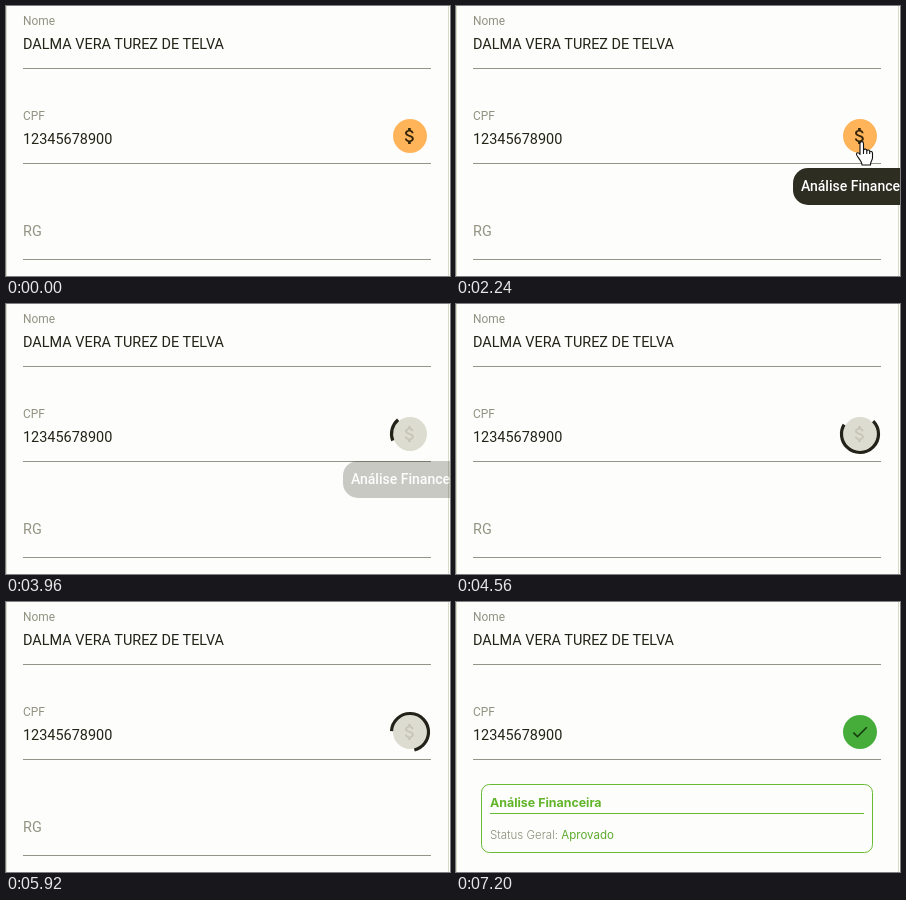
An HTML page that plays this animation: 444 px wide and 270 px high, repeating every 8000 ms.

```html
<!DOCTYPE html>
<html lang="pt">
<head>
<meta charset="utf-8">
<style>
  html, body { margin: 0; width: 100%; height: 100%; overflow: hidden; background: #fdfdfb; }
  svg { display: block; width: 444px; height: 270px; }
  text { font: 14.44px Roboto, sans-serif; fill: #232318; }
  .label { font-size: 11.9px; fill: #929283; }
  .hint { fill: #949484; }
  .rule { stroke: #949488; }
  .edge { stroke: #d9dac8; }
  #tip text { font-size: 14px; font-weight: 500; fill: #fff; }
  #card text { font: 300 11.5px Inter, sans-serif; fill: #8a8e78; }
  #card .title { font: 700 12.4px Inter, sans-serif; fill: #62b52a; }
  #card tspan { font-weight: 400; fill: #5cab2c; }
  #card rect, #card path { fill: none; stroke: #68b934; }
</style>
</head>
<body>
<svg viewBox="0 0 444 270">
  <path class="edge" d="M.5 0V270M442.5 0V270"/>
  <path class="rule" d="M17 62.5H425M17 157.5H425"/>
  <text class="label" x="17" y="19">Nome</text>
  <text x="17" y="43">DALMA VERA TUREZ DE TELVA</text>
  <text class="label" x="17" y="114">CPF</text>
  <text x="17" y="138">12345678900</text>

  <g id="rg">
    <text class="hint" x="17" y="230">RG</text>
    <path class="rule" d="M17 253.5H425"/>
  </g>
  <g id="card">
    <rect x="25.5" y="182.5" width="391" height="68" rx="8"/>
    <text class="title" x="34" y="205">Análise Financeira</text>
    <path d="M34 211.5H408"/>
    <text x="34" y="237">Status Geral: <tspan>Aprovado</tspan></text>
  </g>

  <circle id="pulse" cx="404.5" cy="134" fill="#fff0d2" stroke="#ffbf62" stroke-width="5"/>
  <circle id="button" cx="404" cy="130" r="17"/>
  <path id="dollar" transform="translate(393.3 119.4) scale(.88)" d="M11.8 10.9c-2.27-.59-3-1.2-3-2.15 0-1.09 1.01-1.85 2.7-1.85 1.78 0 2.44.85 2.5 2.1h2.21c-.07-1.72-1.12-3.3-3.21-3.81V3h-3v2.16c-1.94.42-3.5 1.68-3.5 3.61 0 2.31 1.91 3.46 4.7 4.13 2.5.6 3 1.48 3 2.41 0 .69-.49 1.79-2.7 1.79-2.06 0-2.87-.92-2.98-2.1h-2.2c.12 2.19 1.76 3.42 3.68 3.83V21h3v-2.15c1.95-.37 3.5-1.5 3.5-3.55 0-2.84-2.43-3.81-4.7-4.4z"/>
  <path id="check" transform="translate(394 120) scale(.83)" fill="#173b0c" d="M9 16.17L4.83 12l-1.42 1.41L9 19 21 7l-1.41-1.41z"/>
  <circle id="spinner" cx="404" cy="130" r="18.5" pathLength="360" fill="none" stroke="#222218" stroke-width="3.2"/>

  <g id="tip">
    <rect x="337" y="162" width="140" height="37" rx="15" fill="#2d2d22"/>
    <text x="345" y="185">Análise Financeira</text>
  </g>
  <g id="hand" fill="#fff" stroke="#111" stroke-width="1.1" stroke-linejoin="round">
    <path d="M4 2.5C4 0 7.5 0 7.5 2.5V9C8 7.5 10.8 8 10.8 9.6 11.5 8.5 13.7 9 13.7 10.6 14.5 9.7 16.5 10.5 16.5 12V17C16.5 19 14.5 20 14.5 24H6C6 20 1 16 .5 13.5.3 11.5 2.5 11 4 13.5Z"/>
    <path d="M7.5 9V13M10.8 9.6V13M13.7 10.6V13" fill="none"/>
  </g>
</svg>
<script>
const LOOP = 8000, LOAD = 2280, DONE = 6840;
const $ = id => document.getElementById(id);
const set = (id, attrs) => {
  for (const key in attrs) $(id).setAttribute(key, attrs[key]);
};
const ramp = (t, from, to) => Math.min(1, Math.max(0, (t - from) / (to - from)));
const smooth = x => x * x * (3 - 2 * x);
const easeOut = x => 1 - (1 - x) ** 2;
const show = on => on ? 1 : 0;

function drawSpinner(t, loading) {
  // The arc grows, then its tail catches up, while the whole ring turns.
  const phase = ((t - 2205) / 1500 % 1 + 1) % 1;
  const grow = smooth(ramp(phase, 0, .5)), chase = smooth(ramp(phase, .5, 1));
  const start = 43 * grow + 317 * chase;
  const length = Math.min(3 + 252 * grow, 360 - start);
  set('spinner', {
    opacity: show(loading),
    'stroke-dasharray': `${length} 720`,
    transform: `rotate(${.18 * (t - 2960) - 33 + start} 404 130)`
  });
}

function drawPulse(t) {
  const u = t < 2760 ? ramp(t, 2260, 2740) : ramp(t, 2760, 3240);
  set('pulse', {
    r: 5 + 30 * easeOut(u),
    opacity: u > 0 && u < 1 ? 1 - u : 0
  });
}

function draw(t) {
  const loading = t >= LOAD && t < DONE, done = t >= DONE;
  set('button', { fill: done ? '#46ad3b' : loading ? '#dddcd0' : '#ffb45a' });
  set('dollar', { fill: loading ? '#c6c5b8' : '#33240a', opacity: show(!done) });
  set('check', { opacity: show(done) });
  set('rg', { opacity: show(!done) });
  set('card', { opacity: smooth(ramp(t, DONE, 7200)) });
  drawSpinner(t, loading);
  drawPulse(t);

  const enter = easeOut(ramp(t, 1000, 1340)), leave = ramp(t, 3860, 4160);
  set('tip', {
    opacity: enter * (1 - leave) ** 3.4,
    transform: `translate(0 ${-15 * (1 - enter) - 15 * leave})`
  });

  const arrive = easeOut(ramp(t, 440, 840)), exit = smooth(ramp(t, 3640, 3900));
  set('hand', {
    opacity: show(t >= 440 && t < 3900),
    transform: `translate(${446 - 46 * arrive + 46 * exit} ${130 + 5 * arrive - 22 * exit})`
  });
}

function tick() {
  draw(performance.now() % LOOP);
  requestAnimationFrame(tick);
}
tick();
</script>
</body>
</html>
```
